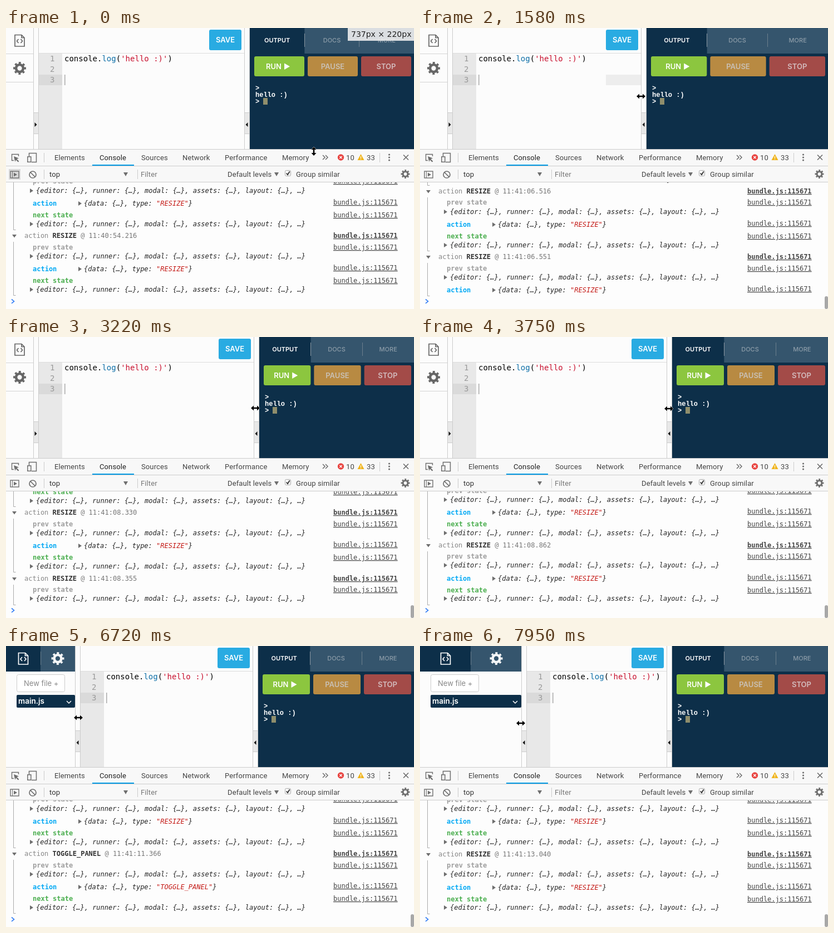
An HTML page that plays this animation: 733x506 px, repeating every 8 s.

```html
<!DOCTYPE html>
<html lang="en">
<head>
<meta charset="utf-8">
<title>Resizable editor panels</title>
<style>
html, body { margin: 0; width: 100%; height: 100%; overflow: hidden; background: #fcfcfc; }
svg { display: block; width: 733px; height: 506px; }
text { white-space: pre; }
.ui { font: 13px Roboto, sans-serif; letter-spacing: .12px; fill: #444; }
.cap { font: 600 13px Inter, sans-serif; text-anchor: middle; }
.tab { font: 500 11px Inter, sans-serif; text-anchor: middle; fill: #8c9ca8; }
.mono { font: 12px "DejaVu Sans Mono", monospace; fill: #222; }
.code { font: 14px "DejaVu Sans Mono", monospace; }
.term { font: bold 12px "Liberation Mono", monospace; fill: #fff; }
.file { font: 13px Inter, sans-serif; fill: #888; }
.b { font-weight: bold; }
.i { font-style: italic; }
.link { text-decoration: underline; fill: #444; }
</style>
</head>
<body>
<svg viewBox="0 0 733 506">
  <defs><clipPath id="logClip"><rect y="278" width="733" height="228"/></clipPath></defs>
  <g id="app"></g>
  <rect y="278" width="733" height="228" fill="#fdfdfd"/>
  <g id="log" clip-path="url(#logClip)"></g>
  <g id="tools"></g>
  <g id="top"></g>
</svg>
<script>
const LOOP = 8000, STEP = 70, PHASE = 40;
const NAVY = '#0d2f49', SLATE = '#35556d';
const $ = id => document.getElementById(id);

const rect = (x, y, w, h, fill, more = '') =>
  `<rect x="${x}" y="${y}" width="${w}" height="${h}" fill="${fill}" ${more}/>`;
const text = (x, y, s, cls, more = '') => `<text x="${x}" y="${y}" class="${cls}" ${more}>${s}</text>`;
const path = (d, fill, more = '') => `<path d="${d}" fill="${fill}" ${more}/>`;
const line = (d, color, w = 1) => path(d, 'none', `stroke="${color}" stroke-width="${w}"`);
const span = (s, fill, cls = '') => `<tspan fill="${fill}" style="fill:${fill}" class="${cls}">${s}</tspan>`;
const at = (x, y, s) => `<g transform="translate(${x} ${y})">${s}</g>`;

function gear(x, y, r, color) {
  const teeth = r * .84, gap = teeth * Math.PI / 8;
  return at(x, y, `<g fill="none" stroke="${color}">
    <circle r="${r * .56}" stroke-width="${r * .4}"/>
    <circle r="${teeth}" stroke-width="${r * .32}" stroke-dasharray="${gap}" transform="rotate(-11.25)"/></g>`);
}

const fileIcon = (x, y, color) => at(x, y,
  line('M-8.5-10H3.5L8.5-5V10.5H-8.5ZM3.5-10V-5H8.5', color, 1.7) +
  line('M-2-2.5L-5 1L-2 4.5M2-2.5L5 1L2 4.5', color, 1.7));

// Monotone cubic track through [time, value] points
function track(keys, t) {
  const n = keys.length - 1;
  if (t <= keys[0][0]) return keys[0][1];
  if (t >= keys[n][0]) return keys[n][1];
  let i = 0;
  while (t >= keys[i + 1][0]) i++;
  const slope = k => (keys[k + 1][1] - keys[k][1]) / (keys[k + 1][0] - keys[k][0]);
  const tan = k => {
    if (k < 1 || k >= n) return 0;
    const a = slope(k - 1), b = slope(k);
    return a * b <= 0 ? 0 : 2 * a * b / (a + b);
  };
  const [t0, a] = keys[i], [t1, b] = keys[i + 1], d = t1 - t0, s = (t - t0) / d;
  return a + s * s * (3 - 2 * s) * (b - a) + d * (s * (1 - s) ** 2 * tan(i) - s * s * (1 - s) * tan(i + 1));
}

const DRAG_LEFT = 6780;
const RIGHT = [[970, 438], [1580, 407], [2400, 372], [2700, 387], [3300, 460], [3750, 453]];
const LEFT = [[DRAG_LEFT - STEP, 133], [7450, 206], [7590, 205], [7950, 191]];
const MOUSE_X = [[40, 553], [560, 428], [970, 428], [1580, 397], [2400, 362], [2700, 393], [3300, 452],
  [3750, 447], [4330, 447], [4740, 54], [4940, 111], [5240, 111], [5680, 56], [6270, 56], [6490, 130],
  [6720, 130], [7450, 202], [7950, 181]];
const MOUSE_Y = [[40, 222], [560, 122], [1580, 123], [2700, 127], [3750, 129], [4940, 128], [5240, 128],
  [5680, 137], [6270, 137], [6490, 129], [6720, 129], [7950, 139]];
const CLOCK = [[1580, 6551], [2700, 7820], [3750, 8862], [4140, 9059], [6690, 11800], [7950, 13040]];

function stamp(ms) {
  const p = (n, w = 2) => String(n).padStart(w, '0');
  return `11:${ms < 0 ? 40 : 41}:${p(Math.floor((ms + 60000) / 1000) % 60)}.${p((ms + 60000) % 1000, 3)}`;
}

function handle(x, dir) {
  return rect(x, 0, 10, 218, '#fcfcfc') + line(`M${x + .5} 0V218M${x + 9.5} 0V218`, '#ccc') +
    rect(x + .5, 152.5, 9, 38, '#e8e8e8', 'stroke="#ccc"') +
    path(dir > 0 ? `M${x + 2.5} 170l4 4l-4 4z` : `M${x + 6.5} 170l-4 4l4 4z`, '#111');
}

function sidebar(L, open) {
  if (!open) {
    return fileIcon(24.5, 22.5, '#666') + gear(24.5, 72.5, 11.5, '#666') +
      line('M0 46.5H49M0 97.5H49', '#d4d4d4') + handle(49, 1);
  }
  const w = L - 9, half = w / 2;
  return rect(0, 0, half, 46, NAVY) + rect(half, 0, half, 46, SLATE) +
    rect(Math.floor(half), 10, 1, 24, '#6c7f8d') +
    fileIcon(Math.round(half / 2), 22.5, '#fff') + gear(Math.round(half * 1.5), 22.5, 11.5, '#f4f6f7') +
    rect(19.5, 51.5, 86, 31, '#fff', 'rx="3" stroke="#ccc"') + text(32, 72, 'New file +', 'file') +
    rect(19, 88, w - 19, 23, NAVY, 'rx="2"') +
    text(22, 104, 'main.js', 'file', 'style="font-size:13.5px;font-weight:600;fill:#fff"') +
    line(`M${w - 15} 99l4 4l4-4`, '#fff', 1.5) + handle(w, -1);
}

function editor(L, R, glow) {
  const rows = [1, 2, 3].map(n => text(L + 29.5, 41 + n * 19, n, 'code', 'text-anchor="end" fill="#999"'));
  const code = 'console.' + span('log', '#0f70a8') + '(' + span("'hello :)'", '#c8102e') + ')';
  return rect(L, 0, R - 9 - L, 218, '#fcfcfc') + rect(L + 1, 46, 42, 172, '#e8e8e8') +
    rect(L + 1, 84, 42, 19, '#dadada') + (glow ? rect(R - 73, 84, 64, 19, '#ededed') : '') +
    line(`M${L} 45.5H${R - 9}`, '#ddd') + rows.join('') +
    text(L + 47, 60, code, 'code') + rect(L + 47, 84, 1.5, 19, '#aaa') +
    rect(R - 73, 3, 58, 37, '#29abe2', 'rx="3"') + text(R - 44, 26, 'SAVE', 'cap', 'fill="#fff"');
}

function output(R) {
  const third = (733 - R) / 3, bw = (708 - R) / 3;
  const mid = k => R + third * (k + .5);
  const button = (k, label, bg, ink, dx) => {
    const x = R + 8 + k * (bw + 6);
    return rect(x, 51, bw, 36, bg, 'rx="3"') + text(x + bw / 2 + dx, 74, label, 'cap', `fill="${ink}"`);
  };
  const runMid = R + 8 + bw / 2;
  return rect(R, 0, 733 - R, 218, NAVY) + rect(R + third, 0, third * 2, 46, SLATE) +
    rect(Math.floor(R + third), 10, 1, 24, '#8a98a2') + rect(Math.floor(R + third * 2), 10, 1, 24, '#6c7f8d') +
    text(mid(0), 26, 'OUTPUT', 'tab', 'style="fill:#fff;font-weight:600"') +
    text(mid(1), 26, 'DOCS', 'tab') + text(mid(2), 26, 'MORE', 'tab') +
    button(0, 'RUN', '#8cc63f', '#fff', -10) + path(`M${runMid + 9} 63.5v11.5l10-5.7z`, '#fff') +
    button(1, 'PAUSE', '#b88a42', '#c9c0b5', 0) + button(2, 'STOP', '#a34b48', '#d3bcbe', 0) +
    text(R + 10, 112, '&gt;', 'term') + text(R + 10, 124, 'hello :)', 'term') +
    text(R + 10, 136, '&gt;', 'term') + rect(R + 24, 126, 8, 12, '#8f8e6c');
}

const STATE = '{' + ['editor', 'runner', 'modal', 'assets', 'layout'].map(k => k + ': {…}, ').join('') + '…}';

// One logged action; depth is the offset of its last printed row
function entry(base, depth, name, time) {
  const y = off => Math.round(base + off);
  const label = (off, s, color) => text(48, y(off) + 4, s, 'mono b', `style="fill:${color}"`);
  const link = (off, dy = 4, cls = '') => text(588, y(off) + dy, 'bundle.js:115671', 'mono link ' + cls);
  const arrow = (x, off) => path(`M${x} ${y(off) - 4}v8l6-4z`, '#6e6e6e');
  const tree = off => arrow(43, off) + text(54, y(off) + 4, STATE, 'mono i');
  let out = path(`M11 ${y(0) - 2}h8l-4 5.5z`, '#6e6e6e') +
    text(33, y(0) + 4, span('action ', '#888') + span(name, '#333', 'b') + span(' @ ' + time, '#777'), 'mono') +
    link(0, 4, 'b');
  if (depth >= 37) out += label(20.6, 'prev state', '#9e9e9e') + link(20.6) + tree(36.8);
  if (depth >= 60) {
    out += label(60, 'action', '#03a9f4') + arrow(130, 60) + link(60, 2) +
      text(140, y(60) + 4, '{data: {…}, type: ' + span(`"${name}"`, '#c41a16') + '}', 'mono i');
  }
  if (depth >= 97) out += label(81, 'next state', '#4caf50') + link(81) + tree(96.8);
  if (depth) out += line(`M17.5 ${y(depth + 10) + .5}H13.5V${y(11)}`, '#aaa');
  return out;
}

function consoleLog(t, q) {
  const drag = t >= 970 && t < 4140 || t >= DRAG_LEFT;
  const toggled = t >= 6100 && t < DRAG_LEFT;
  const n = Math.floor((q - PHASE) / STEP);
  const depth = drag ? [97, 97, 0, 37, 60, 97][n % 6] : 97;
  const base = drag ? 471.5 - depth + (depth === 60 ? .5 : 0) : 373.9;
  const now = t < 970 ? -5784 : toggled ? 11366 : t >= 4140 && t < 6100 ? 9059
    : Math.round(q < 1580 ? q + 4971 : track(CLOCK, q));
  const gap = t < 2000 ? 35 : 25;
  const scroll = t >= 970 && t < 4700 || t >= 6100;
  return [0, 1, 2].map(k => entry(base - k * 118.2, k ? 97 : depth,
    toggled && !k ? 'TOGGLE_PANEL' : 'RESIZE', stamp(now - k * gap))).join('') +
    line('M10 488.5l4.5 3.7l-4.5 3.7', '#3b83f6', 1.7) +
    (scroll ? rect(727, 483, 6, 23, '#a8a8a8', 'rx="3"') : '');
}

function toolbar(hover) {
  const grey = '#6e6e6e';
  const tabs = [['Elements', 87], ['Console', 168], ['Sources', 243], ['Network', 317], ['Performance', 393], ['Memory', 496]];
  return rect(0, 218, 733, 60, '#f8f8f8') +
    line('M0 218.5H733M0 248.5H733M0 277.5H733', '#ccc') +
    line('M68.5 225V242M671.5 225V242M68.5 255V272M236.5 255V272', '#ccc') +
    tabs.map(([s, x]) => text(x, 238, s, 'ui', s === 'Console' ? 'style="fill:#222"' : '')).join('') +
    rect(155, 246, 75, 2, '#039be5') +
    line('M14 238.5H10.5V227.5H22.5V231', grey, 1.4) + path('M14 231l9 3.5l-3.6 1.4l4 4l-1.6 1.6l-4-4l-1.5 3.5z', grey) +
    line('M41.5 231V225.5H54.5V241.5H46', grey, 1.5) + rect(38.8, 231.8, 6, 9.5, '#f8f8f8', `stroke="${grey}" stroke-width="1.5"`) +
    line('M569 229l4 4l-4 4M574 229l4 4l-4 4', grey, 1.5) +
    '<circle cx="601.5" cy="233" r="5.7" fill="#e8433f"/>' + line('M599.3 230.8l4.4 4.4m0-4.4l-4.4 4.4', '#fff', 1.3) +
    text(611, 238, '10', 'ui') + path('M637.5 227l6 11h-12z', '#f0b41c') + line('M637.5 231v3.5M637.5 235.5v1.2', '#fff', 1.3) +
    text(648, 238, '33', 'ui') +
    [228, 233, 238].map(y => `<circle cx="688.5" cy="${y}" r="1.6" fill="${grey}"/>`).join('') +
    line('M714 228.5l9 9m0-9l-9 9', grey, 1.7) +
    (hover ? rect(5, 254, 21, 19, '#d9d9d9') : '') +
    rect(8, 258, 15, 12, 'none', `stroke="${grey}" stroke-width="1.4"`) + line('M11.5 258v12', grey) + path('M14 260.5v7l6-3.5z', grey) +
    `<circle cx="48" cy="264" r="6" fill="none" stroke="${grey}" stroke-width="1.7"/>` + line('M44 260l8 8', grey, 1.7) +
    text(78, 268, 'top', 'ui', 'style="fill:#333"') + path('M211 260h8l-4 7z', grey) +
    text(242, 268, 'Filter', 'ui', 'style="fill:#777"') +
    text(398, 268, 'Default levels', 'ui') + path('M482 260h8l-4 7z', grey) +
    rect(501.5, 256.5, 10, 10, '#f8f8f8', 'rx="2" stroke="#aaa"') + line('M503.7 261.5l2.3 2.7l3.7-6', '#333', 1.8) +
    text(521, 268, 'Group similar', 'ui') + gear(717.5, 263, 8, grey);
}

const CURSORS = {
  resize: path('M-8 0l5-4.5v3.2h6v-3.2l5 4.5l-5 4.5v-3.2h-6v3.2z', '#000', 'stroke="#fff" stroke-width="1" paint-order="stroke"'),
  arrow: path('M0 0v14l3.2-3l2.2 5l2.2-1l-2.2-4.8h4.4z', '#000', 'stroke="#fff"'),
  beam: line('M-3-6.5h2l1 1l1-1h2M0-5.5v11M-3 6.5h2l1-1l1 1h2M-1.5 2h3', '#222', 1.2)
};

function cursor(t, q, L) {
  const x = Math.round(track(MOUSE_X, q)), y = Math.round(track(MOUSE_Y, q));
  let shape = CURSORS.resize;
  if (t < 60) shape = `<g transform="rotate(90)">${shape}</g>`;
  else if (t < 500) shape = CURSORS.arrow;
  else if (t >= 4370 && t < 5680 && x > L + 4 && x < 438) shape = CURSORS.beam;
  else if (t >= 6100 && t < 6490 && x < 120) shape = CURSORS.arrow;
  return at(x, y, shape);
}

const sizeTip = rect(614, 0, 119, 23, '#eee', 'opacity=".9"') +
  text(620, 16, '737px × 220px', '', 'font-family="DejaVu Sans, sans-serif" font-size="14" fill="#222"');

const shown = {};
function put(id, html) {
  if (shown[id] !== html) $(id).innerHTML = shown[id] = html;
}

function draw(t) {
  const q = Math.max(0, Math.floor((t - PHASE) / STEP) * STEP + PHASE);
  const open = t >= 6100;
  const L = open ? Math.round(track(LEFT, q)) : 58;
  const R = Math.round(track(RIGHT, q));
  put('app', rect(0, 0, 733, 218, '#fcfcfc') + editor(L, R, q >= 1510 && q < 1790) +
    sidebar(L, open) + handle(R - 10, -1) + output(R));
  put('log', consoleLog(t, q));
  put('tools', toolbar(t < 970));
  put('top', (t < 790 ? sizeTip : '') + cursor(t, q, L));
}

const start = performance.now();
function frame() {
  draw((performance.now() - start) % LOOP);
  requestAnimationFrame(frame);
}
frame();
</script>
</body>
</html>
```
